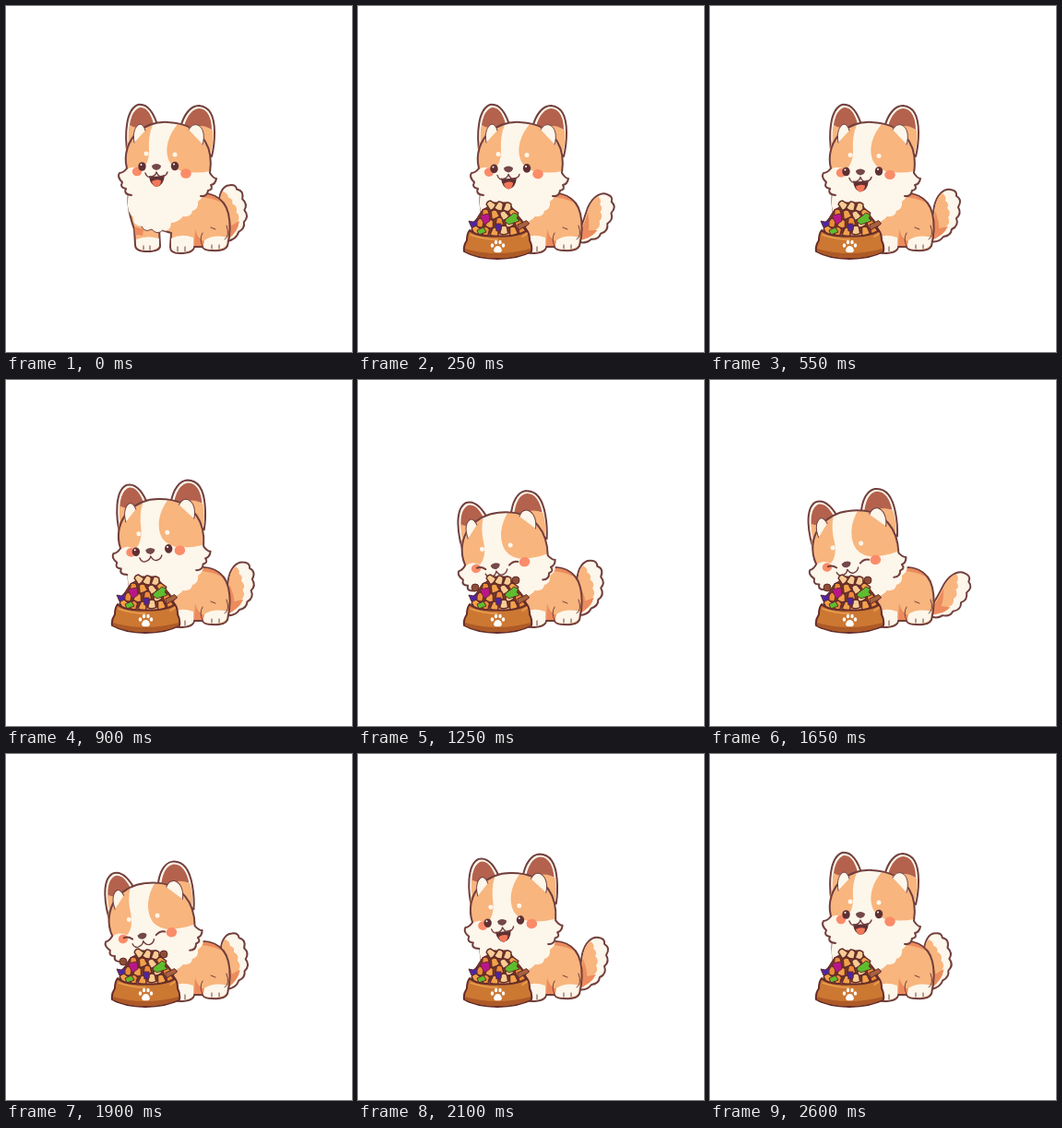
An HTML page for the animation above (2.65 s loop, 375 by 375 pixels).

```html
<!DOCTYPE html>
<html lang="en">
<head>
<meta charset="utf-8">
<title>Puppy dinner</title>
<style>
  html, body { margin: 0; width: 100%; height: 100%; overflow: hidden; background: #fff; }
  svg { display: block; width: 100vw; height: 100vh; }
  .line { fill: none; stroke: #713f3d; stroke-width: 2; stroke-linejoin: round; stroke-linecap: round; }
  .thin { stroke-width: 1; }
  .cream { fill: #fdf6ea; }
  .coat { fill: #f8b57e; }
  .shade { fill: #ec8b5d; }
  .ear { fill: #b4624d; }
  .dark { fill: #5f3034; }
  .blush { fill: #fb8c69; }
</style>
</head>
<body>
<svg viewBox="0 0 375 375">
  <g id="tail">
    <path class="line cream" d="M236 249C241 240 241 229 243 217C246 204 254 197 261 199Q268 200 267 206Q274 210 269 218Q273 225 267 230Q270 238 262 242Q261 249 253 250Q248 257 238 255Z"/>
    <path class="coat" d="M237 250C242 240 242 228 244 217C246 209 249 204 252 203Q257 207 255 211Q260 214 257 219Q262 224 258 229Q261 235 256 239Q256 246 248 249L239 254Z"/>
    <path class="shade" d="M237 251Q243 239 244 222Q249 236 248 241L258 239Q252 250 239 254Z"/>
  </g>

  <g id="body">
    <path class="line coat" d="M198 205C220 199 237 207 241 225C244 238 242 252 240 260Q237 266 224 265Q214 265 213 261L204 261Q203 268 188 268Q178 268 178 261L179 246L166 242L167 260Q167 266 153 266Q140 266 140 259L139 242C134 228 130 212 134 198Z"/>
    <path class="shade" d="M212 204Q226 203 234 213Q223 208 212 207ZM139 239L149 242L148 249Q142 247 140 249ZM205 242Q207 252 215 255L213 260L204 260Z"/>
    <path class="cream" d="M133 196L213 198Q216 207 208 212Q209 220 202 222Q201 229 192 228Q186 235 179 235Q178 246 170 243Q164 249 158 242Q150 246 147 239Q137 238 138 229Q131 224 132 211ZM141 253Q153 248 166 252L166 260Q164 265 153 265Q142 265 141 259ZM179 252Q190 246 203 251L203 262Q200 267 189 267Q179 267 179 261ZM215 254Q225 247 240 251L239 259Q236 264 225 264Q215 264 214 261Z"/>
    <path class="line thin" d="M149 260V264M156 260V264M186 261V266M194 261V266M223 259V263M231 259V263M147 239Q150 246 158 242Q164 249 170 243M239 238Q243 249 237 253M222 240L227 242M213 260Q209 253 213 246"/>
    <path class="coat" d="M156 208Q163 206 169 209Q164 215 156 208Z"/>
    <path class="line thin" d="M147 207L151 209M176 208L179 206M184 209L186 206"/>
  </g>

  <g id="head">
    <g id="leftEar">
      <path class="line cream" d="M132 163C128 139 130 112 143 107C155 105 161 118 165 132Z"/>
      <path class="ear" d="M134 148C132 128 136 113 145 110C154 109 158 120 161 131Q145 134 134 148Z"/>
      <path class="coat" d="M133 150Q132 137 134 129Q140 133 146 132L137 151Z"/>
    </g>
    <path class="line cream" d="M189 132C193 116 201 108 209 108C222 109 226 122 226 137Q226 151 223 163Z"/>
    <path class="ear" d="M193 130C197 117 203 111 210 111C219 112 223 122 223 134Q213 129 201 134Z"/>
    <path class="coat" d="M202 132Q214 127 224 135Q225 149 222 159L212 150Z"/>

    <path class="cream" d="M136 205Q127 204 130 198Q123 197 126 191Q120 185 123 181Q127 181 131 176C127 160 133 146 142 137C152 129 164 125 176 126C195 127 209 135 216 147C222 157 223 168 221 181Q225 187 228 187Q227 193 222 194Q225 199 219 200Q218 207 211 206Q206 212 197 212L150 212Z"/>
    <path class="coat" d="M159 129C142 132 129 145 130 160Q129 169 131 177Q138 172 147 178Q155 171 155 157Q154 140 159 129ZM186 128C176 140 173 152 175 163Q177 174 190 179Q207 182 221 179C223 161 221 148 213 141Q202 130 186 128Z"/>
    <path class="line" d="M136 205Q127 204 130 198Q123 197 126 191Q120 185 123 181Q127 181 131 176C127 160 133 146 142 137C152 129 164 125 176 126C195 127 209 135 216 147C222 157 223 168 221 181Q225 187 228 187Q227 193 222 194Q225 199 219 200Q218 207 211 206"/>
    <path class="line cream thin" d="M139 148C137 137 140 130 145 128Q149 128 151 135M198 134Q202 127 208 129C214 132 216 141 213 150"/>

    <g id="cheeks">
      <ellipse class="blush" cx="142" cy="179.500" rx="5.2" ry="4.8"/>
      <ellipse class="blush" cx="195" cy="181.500" rx="5.8" ry="5.2"/>
      <circle class="cream" cx="152" cy="160" r="2.5"/>
      <circle class="cream" cx="183" cy="161" r="2.5"/>
    </g>
    <g id="face">
      <g id="eyesOpen">
        <ellipse class="dark" cx="147.500" cy="174" rx="4.2" ry="4.8"/>
        <ellipse class="dark" cx="183" cy="173.500" rx="4.2" ry="4.8"/>
        <circle fill="#fff" cx="146.500" cy="172" r="1"/>
        <circle fill="#fff" cx="182" cy="171.500" r="1"/>
      </g>
      <path id="eyesShut" class="line" d="M143 173Q148 172 152 176M188 174Q183 172 178 176"/>
      <path fill="#74484a" d="M158 173Q163 169 168 173Q168 177 163 178Q158 177 158 173Z"/>
      <g id="mouthOpen">
        <path class="dark" d="M155 184Q163 186 172 183Q171 195 163 196Q156 194 155 184Z"/>
        <path fill="#f37758" d="M158 190Q163 187 168 189Q168 195 163 196Q159 195 158 190Z"/>
      </g>
      <path class="line" style="stroke-width:1.4" d="M151 181Q153 187 158 185Q162 184 163 180Q165 185 169 185Q174 184 175 180"/>
    </g>
  </g>

  <g id="bowl" stroke="#652d2a" stroke-linejoin="round">
    <g id="bites" fill="#8d4d35">
      <circle cx="127" cy="225" r="4"/><circle cx="171" cy="217" r="4"/>
    </g>
    <path fill="#7a3a28" d="M122 246L127 233L134 222L147 213L163 213L172 225L180 235L184 246Z"/>
    <g id="food" stroke-width="1.5"></g>
    <path fill="#ba168b" d="M132 227L142 225L143 233L137 237Z"/>
    <path fill="#4d25a9" d="M120 233L125 234L129 231L129 238L123 240ZM149 236L155 236L155 243L150 244Z"/>
    <path fill="#5dbd2d" d="M160 231L167 226Q168 223 171 225Q175 226 172 230L175 233L166 236Q163 238 161 235Q158 234 160 231ZM129 243L136 240L139 245L131 248Z"/>
    <path fill="#a8613f" d="M173 237L180 234Q183 231 184 234Q187 236 183 238L177 241Q175 244 173 241Z"/>
    <path fill="#cc7833" stroke-width="2" d="M121 243Q126 248 138 249Q152 250 166 249Q179 247 183 243Q186 247 186 254Q189 260 188 266Q174 274 151 274Q129 274 115 266Q114 260 118 254Q118 247 121 243Z"/>
    <path fill="none" stroke="#e9a052" stroke-width="1.6" stroke-linecap="round" d="M122 248Q136 253 151 253M178 250L183 247"/>
    <path fill="#ad5a27" stroke="none" d="M116 263Q150 273 187 263L187 266Q174 273 151 273Q129 273 116 266Z"/>
    <g fill="#fff" stroke="none">
      <path d="M147 265Q148 260 151.500 260Q155 260 156 265Q155 268 151.500 267Q148 268 147 265Z"/>
      <ellipse cx="145.500" cy="259.500" rx="1.700" ry="2.200"/><ellipse cx="149.500" cy="256" rx="1.700" ry="2.300"/>
      <ellipse cx="154" cy="256" rx="1.700" ry="2.300"/><ellipse cx="157.500" cy="259.500" rx="1.700" ry="2.200"/>
    </g>
  </g>
</svg>
<script>
const LOOP = 2650, STEP = 50;
const el = id => document.getElementById(id);
const show = (id, on) => el(id).style.display = on ? "" : "none";
const move = (id, value) => el(id).setAttribute("transform", value);

// time, wag cycles
const WAG = [[0, 0], [550, .75], [900, 1.22], [1250, 1.83], [1650, 2.5], [2100, 3.25], [LOOP, 4]];
// time, x, y, tilt, downward look
const HEAD = [
  [0, 0, 0, 0, 0], [550, 0, 0, 0, 5.5], [800, -6, 3, -4.5, 7], [900, -6, 3, -4.5, 7],
  [1100, -13, 10, -10, 8], [1250, -13, 17, -10, 8], [1450, -18, 16, -12, 8],
  [1650, -14, 15, -11, 8], [1800, -20, 17, -13, 8], [1950, -12, 12, -9, 7],
  [2100, -6, 3, -4.5, 4], [2200, 0, 0, 0, 3], [2550, 0, 0, 0, 0], [LOOP, 0, 0, 0, 0]
];
const linear = u => u, smooth = u => u * u * (3 - 2 * u);

function sample(keys, t, ease) {
  const i = keys.findIndex(k => k[0] > t);
  const a = keys[i - 1], b = keys[i], u = ease((t - a[0]) / (b[0] - a[0]));
  return a.slice(1).map((v, j) => v + (b[j + 1] - v) * u);
}

// Kibble rows, back to front
const KIBBLE = ["#f7cc93", "#f2a14b", "#ed8b38"];
let pieces = "", n = 0;
[[3, 217, 9], [4, 226, 10], [5, 235, 10.5], [6, 244, 10]].forEach(([count, y, gap], row) => {
  for (let i = 0; i < count; i++, n++) {
    const x = 153 + (i - (count - 1) / 2) * gap;
    const color = row ? KIBBLE[n % 5 ? 1 + n % 2 : 0] : KIBBLE[0];
    pieces += `<path fill="${color}" transform="translate(${x} ${y + n % 3 - 1}) rotate(${(n * 67) % 80 - 40})" d="M-4 4L-3 -4Q0 -6 3 -4L5 3Q0 6 -4 4Z"/>`;
  }
});
el("food").innerHTML = pieces;

function draw(now) {
  const t = Math.floor(now % LOOP / STEP) * STEP;
  const [wag] = sample(WAG, t, linear);
  const [x, y, tilt, look] = sample(HEAD, t, smooth);
  const eating = t >= 1050 && t < 1950;
  move("tail", `rotate(${-20 * Math.cos(wag * 2 * Math.PI)} 238 250)`);
  move("head", `translate(${x} ${y}) rotate(${tilt} 175 190)`);
  move("leftEar", `translate(0 ${-tilt * .25})`);
  move("face", `translate(0 ${look})`);
  move("cheeks", `translate(0 ${look * .25})`);
  show("eyesOpen", !eating);
  show("eyesShut", eating);
  show("mouthOpen", t < 700 || t >= 2000);
  show("bites", eating);
  show("bowl", t >= 100);
  requestAnimationFrame(() => draw(performance.now() - start));
}
const start = performance.now();
draw(0);
</script>
</body>
</html>
```
